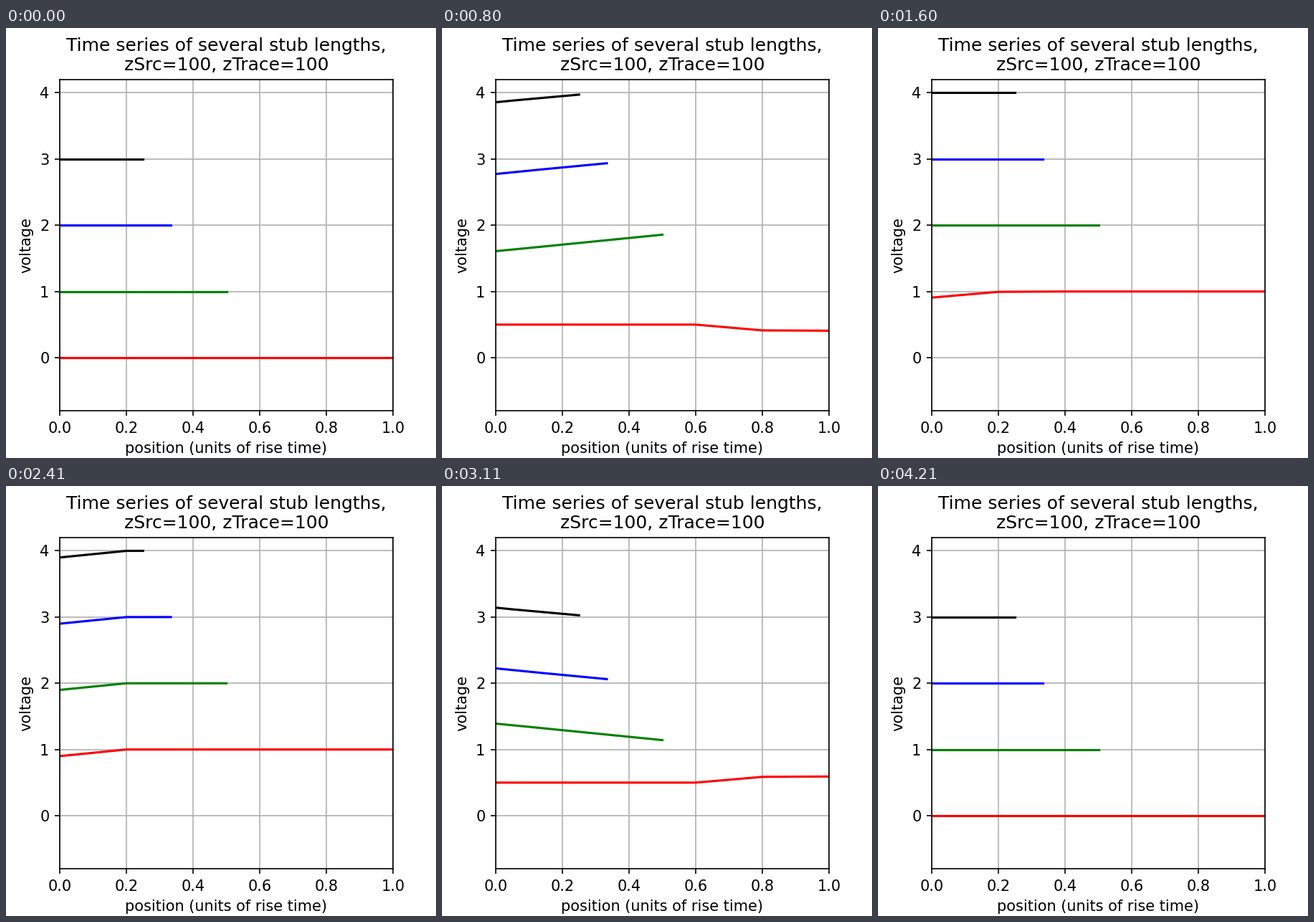
These frames come from a looping animation (600 px wide and 600 px high, 4700 ms). A matplotlib script:

```python
import numpy as np
import matplotlib.pyplot as plt
from matplotlib.animation import FuncAnimation

FRAMES = 47
INTERVAL = 100      # ms
DT = 0.2            # rise times per frame
FALL_START = 23 * DT

# length, vertical offset and colour of each stub
STUBS = [(1, 0, "r"), (1 / 2, 1, "g"), (1 / 3, 2, "b"), (1 / 4, 3, "k")]

# delay and weight of the taps that form the reflection at the open end
TAPS = [(0.2, 0.13), (0.4, 0.82), (0.601, 0.05)]

GRID = np.arange(-10, FRAMES + 1) * DT


def incident(t):
    """Wave entering the stub: half of a pulse with linear edges."""
    return 0.5 * (np.clip(t, 0, 1) - np.clip(t - FALL_START, 0, 1))


def reflected(t, length):
    """Wave leaving the open end, linear between time steps."""
    steps = sum(w * incident(GRID - length - lag) for lag, w in TAPS)
    return np.interp(t, GRID, steps)


def voltage(x, t, length):
    return incident(t - x) + reflected(t - (length - x), length)


fig, ax = plt.subplots(figsize=(4, 4), dpi=150)
fig.subplots_adjust(left=0.125, right=0.9, bottom=0.11, top=0.88)
ax.set(xlim=(0, 1), ylim=(-0.8, 4.2),
       xlabel="position (units of rise time)", ylabel="voltage",
       title="Time series of several stub lengths,\nzSrc=100, zTrace=100")
ax.grid(True)

lines = []
for length, offset, color in STUBS:
    x = np.linspace(0, length, 121)
    lines.append(ax.plot(x, np.full_like(x, offset), color=color)[0])


def update(frame):
    for line, (length, offset, _) in zip(lines, STUBS):
        x = line.get_xdata()
        line.set_ydata(offset + voltage(x, frame * DT, length))
    return lines


anim = FuncAnimation(fig, update, frames=FRAMES, interval=INTERVAL,
                     repeat=True, repeat_delay=0)
plt.show()
```
